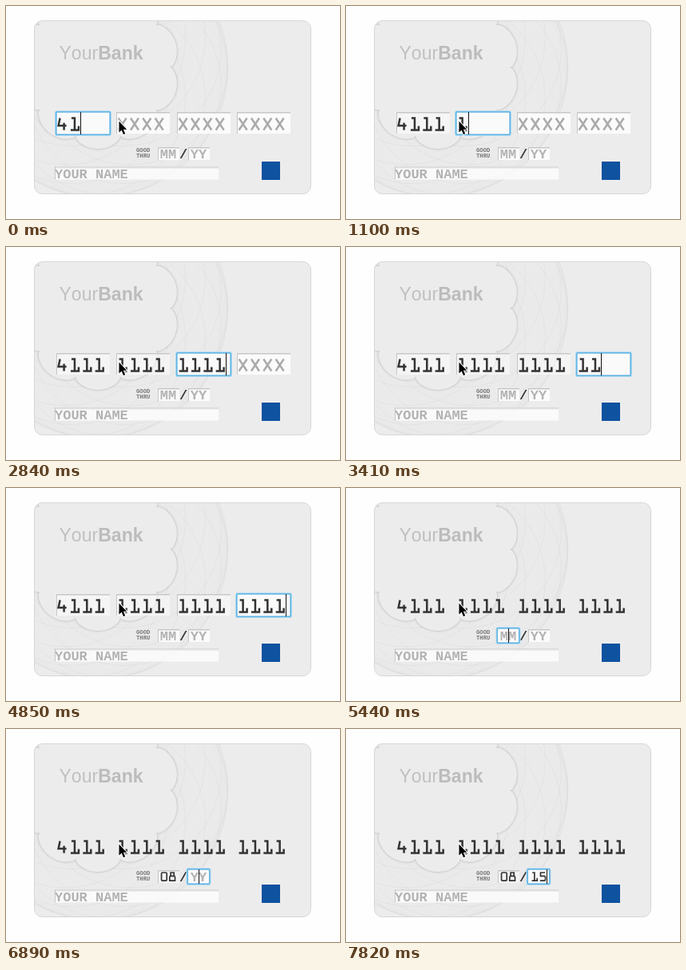
These frames come from a looping animation (418 by 267 pixels, 8 s). An HTML page with a canvas:

```html
<!DOCTYPE html>
<html lang="en">
<head>
<meta charset="utf-8">
<title>Card form</title>
<style>
  html, body { margin: 0; width: 100%; height: 100%; overflow: hidden; background: #fefefe; }
  canvas { display: block; }
</style>
</head>
<body>
<canvas id="stage" width="418" height="267"></canvas>
<script>
const LOOP = 8000;
const ctx = document.getElementById('stage').getContext('2d');

// Stroked machine-readable characters on a 10 x 15 grid
const GLYPHS = {
  0: 'M2 0H8Q10 0 10 2V13Q10 15 8 15H2Q0 15 0 13V2Q0 0 2 0Z',
  1: 'M1 0H5V15M0 15H10V10',
  4: 'M2 0L0 9.500H10M7 6V15',
  5: 'M9.500 0H1V6.500H8Q10 6.500 10 8.500V13Q10 15 8 15H0',
  8: 'M2 0H8V6.500H2ZM1 6.500H9L10 8.500V15H0V8.500Z',
  X: 'M0 0L10 15M10 0L0 15'
};
for (const c in GLYPHS) GLYPHS[c] = new Path2D(GLYPHS[c]);
const PITCH = 15.35;

// Times at which each field gains focus and receives its keys
const bigField = (i, focus, text, keys) =>
  ({ big: true, x: Math.floor(63 + 75.5 * i), y: 133, w: 67, h: 28, hint: 'XXXX', focus, text, keys });
const smallField = (x, hint, focus, text, keys) =>
  ({ x, y: 176, w: 27, h: 18, hint, focus, text, keys });
const fields = [
  bigField(0, 0, '4111', [0, 0, 260, 560]),
  bigField(1, 650, '1111', [1100, 1270, 1450, 1900]),
  bigField(2, 1960, '1111', [2260, 2460, 2670, 2840]),
  bigField(3, 2930, '1111', [3200, 3410, 3620, 3860]),
  smallField(189.5, 'MM', 5440, '08', [6740, 6820]),
  smallField(227.5, 'YY', 6890, '15', [7700, 7820])
];
const NUMBER_DONE = 5440;
const caretOff = [[4370, 4850], [5360, 5440], [6150, 6660], [7460, 7700]];

// Guilloche: a ten-lobed rosette inside a mesh of off-centre circles
const CX = 115, CY = 77, LOBES = 10;
const rosette = new Path2D();
for (let a = 0; a < 360; a++) {
  const angle = a * Math.PI / 180;
  const r = 90 + 12 * Math.abs(Math.sin(angle * LOBES / 2)) ** 0.6;
  rosette.lineTo(CX + r * Math.cos(angle), CY + r * Math.sin(angle));
}
rosette.closePath();

function circles(count, offset, radius) {
  return Array.from({ length: count }, (_, i) => {
    const angle = i / count * 2 * Math.PI;
    const path = new Path2D();
    path.arc(CX + offset * Math.cos(angle), CY + offset * Math.sin(angle), radius, 0, 7);
    return path;
  });
}
const mesh = circles(100, 37, 126);
const arcs = circles(LOBES, 40, 122);

const card = new Path2D();
card.roundRect(35.5, 18.5, 346, 217, 10);
const arrow = new Path2D('M141.5 144.500V158.500L144.600 155.600L147 161L149.200 160L146.900 154.700H151.200Z');

const MONO = '"Liberation Mono", monospace';
const WORDS = 'bold 17px ' + MONO;

function text(string, x, y, font, color, align = 'left') {
  ctx.font = font;
  ctx.fillStyle = color;
  ctx.textAlign = align;
  ctx.fillText(string, x, y);
}

function stroke(path, color, width) {
  ctx.strokeStyle = color;
  ctx.lineWidth = width;
  ctx.stroke(path);
}

function glyphs(string, x, y, scale, color) {
  [...string].forEach((c, i) => {
    ctx.save();
    ctx.translate(x + (PITCH * i + 2.6) * scale, y);
    ctx.scale(scale, scale);
    stroke(GLYPHS[c], color, 2.5);
    ctx.restore();
  });
}

function box(x, y, w, h, whiteness) {
  ctx.fillStyle = `rgba(255,255,255,${whiteness})`;
  ctx.fillRect(x, y, w, h);
  ctx.fillStyle = '#c6c6c6';
  ctx.fillRect(x, y, w, 1);
  ctx.fillRect(x, y, 1, h);
  ctx.fillStyle = '#e2e2e2';
  ctx.fillRect(x + 1, y + 1, w - 1, 1);
}

function ring(x, y, w, h, grow, color, width) {
  const path = new Path2D();
  path.roundRect(x - grow, y - grow, w + 2 * grow, h + 2 * grow, 1.5);
  stroke(path, color, width);
}

function drawCard() {
  ctx.fillStyle = '#fefefe';
  ctx.fillRect(0, 0, 418, 267);
  ctx.fillStyle = '#ececec';
  ctx.fill(card);

  ctx.save();
  ctx.clip(card);
  for (const line of mesh) stroke(line, 'rgba(0,0,0,.022)', 0.6);
  for (const line of arcs) stroke(line, 'rgba(0,0,0,.035)', 1);
  stroke(rosette, 'rgba(0,0,0,.03)', 5);
  stroke(rosette, 'rgba(0,0,0,.08)', 2);
  ctx.fillStyle = '#ececec';
  ctx.fill(rosette);
  ctx.restore();
  stroke(card, '#d6d6d6', 1);

  ctx.fontKerning = 'none';
  text('Your', 66.5, 67, '23px "Liberation Sans", sans-serif', '#c0c0c0');
  text('Bank', 171.5, 67, 'bold 23px "Liberation Sans", sans-serif', '#bcbcbc', 'right');
  const tiny = 'bold 7.2px ' + MONO;
  text('GOOD', 163, 182.5, tiny, '#777');
  text('THRU', 163, 190, tiny, '#777');
  text('/', 222, 190.5, WORDS, '#333', 'center');
  box(61, 201.5, 205, 16, 0.75);
  text('YOUR NAME', 61, 215.5, WORDS, '#b2b2b2');

  ctx.fillStyle = '#0f52a0';
  ctx.fillRect(320, 195, 23, 23);
}

function drawField(f, focused, t) {
  const { x, y, w, h } = f;
  const count = f.keys.filter(k => t >= k).length;
  const center = x + w / 2;
  if (focused) {
    ctx.fillStyle = '#fafafa';
    ctx.fillRect(x, y, w, h);
    ring(x, y, w, h, 0.7, '#b5dcf2', 2.6);
    ring(x, y, w, h, 0.3, '#62b5e5', 1.6);
  } else if (!f.big || t < NUMBER_DONE) {
    const inset = f.big ? 0 : 1;
    box(Math.round(x), y + inset, w, h - 1 - inset, count ? 0.45 : 0.8);
  }

  const typed = f.text.slice(0, count);
  if (f.big) glyphs(typed || f.hint, x, 140.5, 1, count ? '#333' : '#aaa');
  else if (count) glyphs(typed, center - count * 5.1, 180, 0.67, '#333');
  else text(f.hint, center, 190.5, WORDS, '#b2b2b2', 'center');

  if (focused && !caretOff.some(([from, to]) => t >= from && t < to)) {
    const caret = f.big ? x + PITCH * count : center + 5.1 * count;
    ctx.fillStyle = '#111';
    ctx.fillRect(Math.floor(caret), y, 1, h);
  }
}

function draw(t) {
  const active = fields.findLast(f => t >= f.focus);
  drawCard();
  for (const f of fields) drawField(f, f === active, t);
  stroke(arrow, '#fff', 2);
  ctx.fillStyle = '#000';
  ctx.fill(arrow);
}

let start;
function tick(now) {
  start ??= now;
  draw((now - start) % LOOP);
  requestAnimationFrame(tick);
}
requestAnimationFrame(tick);
</script>
</body>
</html>
```
